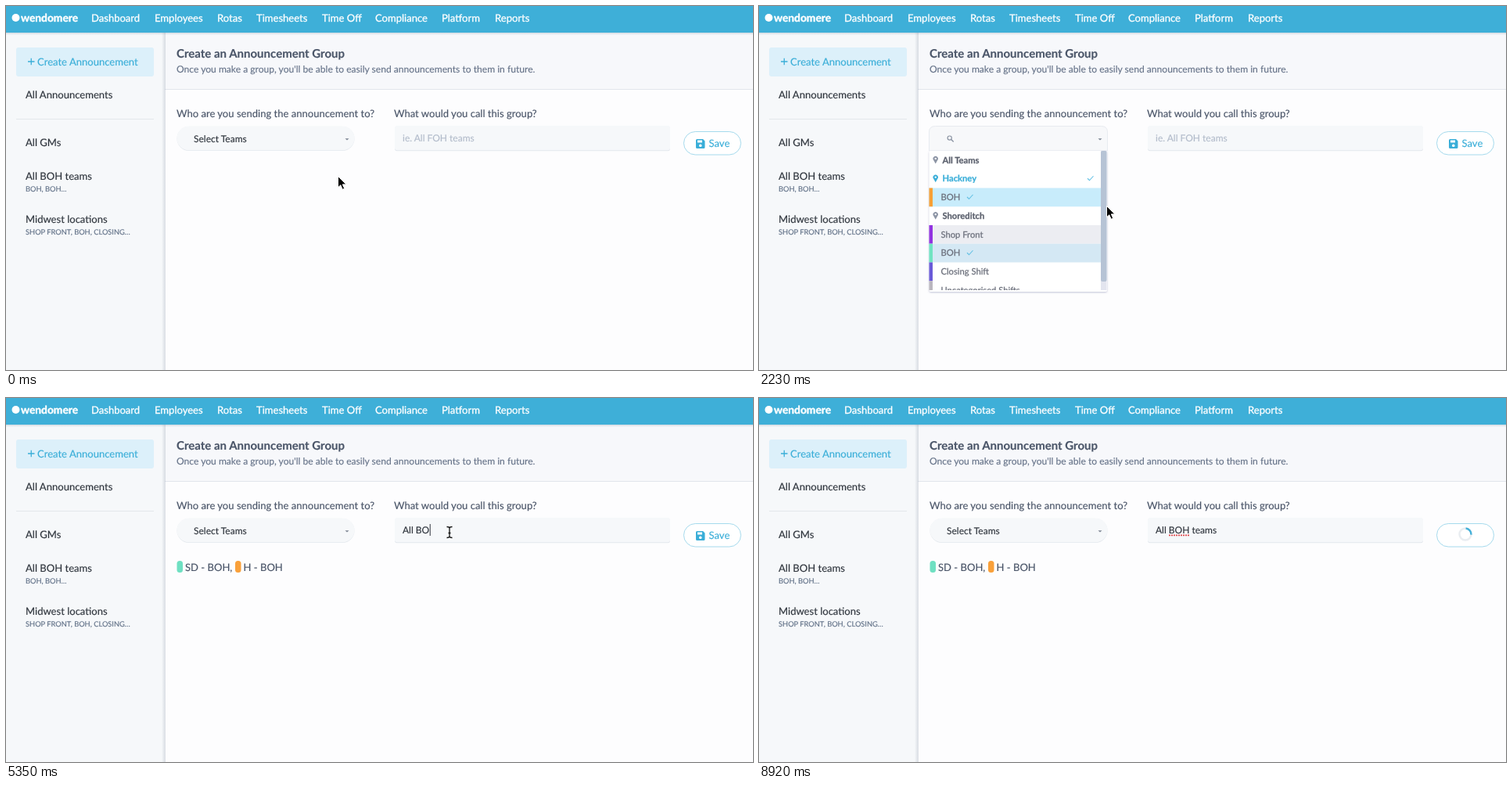
Recreate the animation shown at these times as an HTML page. Size 955 by 465 pixels, loop 9.02 s.

```html
<!DOCTYPE html>
<html lang="en">
<head>
<meta charset="utf-8">
<title>Create an announcement group</title>
<style>
  html, body { margin: 0; width: 100%; height: 100%; overflow: hidden; background: #fdfdfe; }
  svg { display: block; }
  text {
    font: 13.05px Lato, sans-serif; text-rendering: geometricPrecision; white-space: pre;
    fill: currentColor; stroke: currentColor; stroke-width: .15px;
  }
  .nav { color: #fff; }
  .nav text { stroke-width: .3px; }
  .nav .brand { font-size: 13.8px; font-weight: 700; stroke-width: .4px; }
  .blue { color: #3aaed8; }
  .ink { color: #2f353d; }
  .slate { color: #4a5568; }
  .title { font-size: 15px; font-weight: 700; }
  .sub { font-size: 12.1px; color: #667389; }
  .tiny { font-size: 9.3px; color: #5f6f86; }
  .field { font-size: 12px; }
  .hint { color: #b3bccb; }
  .row text { font-size: 11.2px; color: #6a6e7a; stroke-width: .25px; }
  .row .place { font-weight: 700; color: #5b606d; }
  .row .bg { fill: transparent; }
  .row .pin { fill: #8d95a5; }
  .row .check { display: none; fill: none; stroke: #62c0e4; stroke-width: 1.1; }
  .row.hover .bg { fill: #ecedf2; }
  .row.on .check { display: inline; }
  .row.on .bg { fill: #d4e8f4; }
  .row.group.on .bg { fill: transparent; }
  .row.group.on + .row .bg { fill: #c8ecfb; }
  .row.group.on .place { color: #3aaed8; }
  .row.group.on .pin { fill: #3aaed8; }
  #saveBox { fill: #fff; stroke: #a5daed; }
  #saveBox.hover { stroke: #3ba8cd; }
</style>
</head>
<body>
<svg width="955" height="465" viewBox="0 0 955 465">
  <defs>
    <linearGradient id="edge"><stop offset="0" stop-color="#8b97a8" stop-opacity="0"/><stop offset="1" stop-color="#8b97a8" stop-opacity=".3"/></linearGradient>
    <linearGradient id="drop" x2="0" y2="1"><stop offset="0" stop-color="#5b7891" stop-opacity=".25"/><stop offset="1" stop-color="#5b7891" stop-opacity="0"/></linearGradient>
    <filter id="soft" x="-5%" y="-5%" width="110%" height="112%"><feDropShadow dx="0" dy="1" stdDeviation="1.3" flood-color="#8d92b5" flood-opacity=".55"/></filter>
    <clipPath id="listClip"><rect x="217" y="185" width="228" height="178"/></clipPath>
  </defs>

  <rect width="955" height="465" fill="#fdfdfe"/>
  <rect x="203" y="34" width="752" height="72" fill="#f7f8fb"/>
  <rect x="203" y="106" width="752" height="1" fill="#e2e6ec"/>
  <rect y="34" width="203" height="431" fill="#f6f8fa"/>
  <rect x="199" y="34" width="5" height="431" fill="url(#edge)"/>
  <rect y="34" width="955" height="3" fill="url(#drop)"/>
  <rect width="955" height="34" fill="#3eafd8"/>

  <g class="nav">
    <circle cx="12.5" cy="15" r="5" fill="#fff"/>
    <text class="brand" x="19" y="20">wendomere</text>
    <text x="109" y="20">Dashboard</text>
    <text x="190" y="20">Employees</text>
    <text x="270" y="20">Rotas</text>
    <text x="320" y="20">Timesheets</text>
    <text x="404" y="20">Time Off</text>
    <text x="472" y="20">Compliance</text>
    <text x="557" y="20">Platform</text>
    <text x="625" y="20">Reports</text>
  </g>

  <rect x="13" y="53" width="176" height="37" rx="3" fill="#dcf0fa"/>
  <path d="M28 71h8.500M32.250 66.750v8.500" stroke="#3aaed8" stroke-width="1.300"/>
  <text class="blue" x="40" y="76">Create Announcement</text>
  <g class="ink">
    <text x="25" y="118">All Announcements</text>
    <rect x="13" y="144" width="176" height="1" fill="#e3e7eb"/>
    <text x="25" y="179">All GMs</text>
    <text x="25" y="222">All BOH teams</text>
    <text class="tiny" x="25" y="237">BOH, BOH…</text>
    <text x="25" y="277">Midwest locations</text>
    <text class="tiny" x="25" y="292">SHOP FRONT, BOH, CLOSING…</text>
  </g>

  <g class="slate">
    <text class="title" x="218" y="66">Create an Announcement Group</text>
    <text class="sub" x="218" y="85">Once you make a group, you'll be able to easily send announcements to them in future.</text>
    <text x="218" y="142">Who are you sending the announcement to?</text>
    <text x="496" y="142">What would you call this group?</text>
  </g>

  <g id="closed">
    <rect x="218.500" y="154" width="227" height="31" rx="15.500" fill="#e3e8ed"/>
    <rect x="218.500" y="153.500" width="227" height="30.700" rx="15.300" fill="#f6f8fa"/>
    <text class="field ink" x="240" y="174">Select Teams</text>
  </g>

  <g id="open">
    <path d="M217.500 185V161q0-7.500 8-7.500h212q8 0 8 7.500v24z" fill="#f7f8fa" stroke="#e8ebf0"/>
    <circle cx="243.700" cy="168.600" r="2.600" fill="none" stroke="#8c95a4" stroke-width="1.200"/>
    <path d="M245.700 170.600l3 3" stroke="#8c95a4" stroke-width="1.400"/>
    <rect id="searchCaret" x="256.500" y="161" width="1.200" height="17" fill="#3f4650"/>
    <rect x="217.500" y="185" width="227.500" height="180" rx="2" fill="#fff" filter="url(#soft)"/>
    <g id="rows" clip-path="url(#listClip)"></g>
    <rect x="437" y="185" width="7.500" height="178" fill="#e3e5ef"/>
    <rect x="437" y="185" width="7.500" height="167" rx="2" fill="#b6c3d5"/>
  </g>
  <path d="M433.500 169.300h5l-2.500 2.200z" fill="#7b8492"/>

  <g id="tags" class="slate">
    <rect x="218.500" y="208" width="7.500" height="15" rx="3.500" fill="#6fe0c2"/>
    <text x="229" y="221">SD - BOH,</text>
    <rect x="293" y="208" width="7.500" height="15" rx="3.500" fill="#f9a03a"/>
    <text x="303.500" y="221">H - BOH</text>
  </g>

  <rect x="497" y="154" width="352" height="31.300" rx="3" fill="#e1e6ec"/>
  <rect x="497" y="153" width="352" height="31.300" rx="3" fill="#f6f8fa"/>
  <text id="hint" class="field hint" x="507" y="173">ie. All FOH teams</text>
  <text id="typed" class="field ink" x="507" y="173"></text>
  <path id="squiggle" d="M524 175.300h26" stroke="#e0484c" stroke-width="1.700" stroke-dasharray="2 1"/>
  <rect id="caret" y="161" width="1" height="15" fill="#2f353d"/>

  <rect id="saveBox" x="866.500" y="160.500" width="73" height="29.500" rx="14.750"/>
  <g id="save" class="blue">
    <path fill-rule="evenodd" d="M883.500 170h7.500l2.500 2.500v8q0 1.500-1.500 1.500h-8.500q-1.500 0-1.500-1.500v-9q0-1.500 1.500-1.500zM884 171.500v3h6v-3zM887.800 176.500a1.800 1.800 0 1 0 .01 0z" fill="#3aaed8"/>
    <text x="898.500" y="180">Save</text>
  </g>
  <g id="spinner" fill="none" stroke-width="2.500">
    <circle cx="903" cy="174" r="7.500" stroke="#e9edf1"/>
    <path id="arc" d="M897.700 168.700a7.500 7.500 0 0 1 10.600 0" stroke="#46b1d9"/>
  </g>

  <g id="cursor">
    <path id="arrow" d="M.5 .5V14.800l3.300-3 2.400 5.500 2.500-1.100-2.400-5.300h4.600z" stroke="#fff"/>
    <path id="hand" d="M4 10V2.200a1.300 1.300 0 0 1 2.600 0V7l1-.6 1.500.6 1.200-.2 1.200.8 1.100.1.900 1V12l-1.500 3.500v2H5.800L4.900 15 1 10.700a1.200 1.200 0 0 1 1.800-1.500zM7.700 11v3.500M9.700 11v3.500M11.500 11v3" fill="#fff" stroke="#111" stroke-width="1.100"/>
    <path id="beam" d="M-3.500-6.500q3 0 3.500 1.500q.5-1.500 3.500-1.500M0-5V6M-3.500 7.500q3 0 3.500-1.500q.5 1.500 3.500 1.500M-1.500 1.500h3" fill="none" stroke="#111" stroke-width="1.300"/>
  </g>
</svg>
<script>
const LOOP = 9020;
const OPEN = 590, PICK_GROUP = 1180, PICK_TEAM = 1780, CLOSE = 2670;
const FOCUS = 3560, BLUR = 6980, SUBMIT = 7870;

const $ = id => document.getElementById(id);
const show = (id, on) => { $(id).style.display = on ? 'inline' : 'none'; };
const within = (t, from, to = LOOP) => t >= from && t < to;
// Last entry whose start time has passed.
const current = (keys, t) => keys.filter(key => key[0] <= t).pop();

// label, bar colour (none for a location heading)
const rows = [
  ['All Teams'], ['Hackney'], ['BOH', '#f7a035'], ['Shoreditch'],
  ['Shop Front', '#9233e0'], ['BOH', '#6fe3c1'], ['Closing Shift', '#6a5ad8'],
  ['Uncategorised Shifts', '#bab6be']
];
$('rows').innerHTML = rows.map(([label, bar], i) => {
  const y = 185 + i * 23.75, mid = y + 11.5;
  const check = `<path class="check" d="M${bar ? 266 : 420} ${mid}l2.500 2.500 5-5.500"/>`;
  const mark = bar
    ? `<rect x="217.500" y="${y}" width="4.500" height="23.750" fill="${bar}"/>`
    : `<path class="pin" fill-rule="evenodd" d="M225.700 ${mid + 5}l-2.500-4.500a3.200 3.200 0 1 1 5 0zM225.700 ${mid - 2.800}a1.200 1.200 0 1 0 .01 0z"/>`;
  return `<g class="row ${bar ? '' : 'group'}"><rect class="bg" x="217.500" y="${y}" width="219.500" height="23.750"/>${mark}
    <text class="${bar ? '' : 'place'}" x="${bar ? 232.5 : 234.5}" y="${mid + 4.2}">${label}</text>${check}</g>`;
}).join('');
const rowNodes = [...$('rows').children];

const cursorKeys = [
  [0, 'arrow', 424, 217], [140, 'arrow', 408, 190], [290, 'hand', 395, 163],
  [740, 'hand', 330, 205], [890, 'hand', 295, 220],
  [1480, 'hand', 291, 250], [1630, 'hand', 287, 290], [1780, 'hand', 284, 319],
  [2080, 'hand', 345, 285], [2230, 'arrow', 444, 255], [2380, 'arrow', 525, 238],
  [2530, 'arrow', 587, 223], [2820, 'arrow', 580, 220], [2970, 'arrow', 571, 216],
  [3110, 'arrow', 559, 208], [3260, 'arrow', 558, 194], [3410, 'beam', 565, 175],
  [3560, 'beam', 567, 171], [6980, 'beam', 620, 165], [7130, 'beam', 740, 160],
  [7280, 'arrow', 852, 155], [7430, 'hand', 874, 168], [7580, 'hand', 877, 176],
  [8320, 'arrow', 868, 260], [8470, 'arrow', 850, 370], [8620, 'arrow', 835, 452],
  [8770, 'none', 0, 0]
];
const hoverKeys = [[0, -1], [740, 0], [890, 1], [1480, 2], [1630, 4], [1780, 5], [2080, 4]];
const typingKeys = [
  [0, 0], [4460, 1], [4750, 2], [4900, 3], [5200, 5], [5350, 6], [5490, 7],
  [5640, 8], [6090, 9], [6240, 10], [6380, 11], [6530, 13]
];
const groupName = 'All BOH teams';

function drawList(t) {
  const open = within(t, OPEN, CLOSE);
  show('open', open);
  show('closed', !open);
  show('searchCaret', within(t, OPEN, PICK_GROUP));
  const hovered = current(hoverKeys, t)[1];
  rowNodes.forEach((row, i) => {
    const picked = i === 5 ? t >= PICK_TEAM : (i === 1 || i === 2) && t >= PICK_GROUP;
    row.classList.toggle('hover', i === hovered);
    row.classList.toggle('on', picked);
  });
  show('tags', t >= CLOSE);
}

function drawInput(t) {
  const text = groupName.slice(0, current(typingKeys, t)[1]);
  const typed = $('typed');
  if (typed.textContent !== text) typed.textContent = text;
  show('hint', !text);
  show('squiggle', t >= BLUR);
  show('caret', within(t, FOCUS, BLUR) && !within(t, 4160, 4460));
  $('caret').setAttribute('x', 507.5 + (text ? typed.getComputedTextLength() : 0));
}

function drawSave(t) {
  const busy = t >= SUBMIT;
  show('save', !busy);
  show('spinner', busy);
  $('saveBox').classList.toggle('hover', within(t, 7430, 8320));
  const angle = -10 + 60 * Math.floor((t - SUBMIT) / 150);
  $('arc').setAttribute('transform', `rotate(${angle} 903 174)`);
}

function drawCursor(t) {
  const [, shape, x, y] = current(cursorKeys, t);
  for (const id of ['arrow', 'hand', 'beam']) show(id, id === shape);
  $('cursor').setAttribute('transform', `translate(${x} ${y})`);
}

const start = performance.now();
function frame() {
  const t = (performance.now() - start) % LOOP;
  drawList(t);
  drawInput(t);
  drawSave(t);
  drawCursor(t);
  requestAnimationFrame(frame);
}
frame();
</script>
</body>
</html>
```
